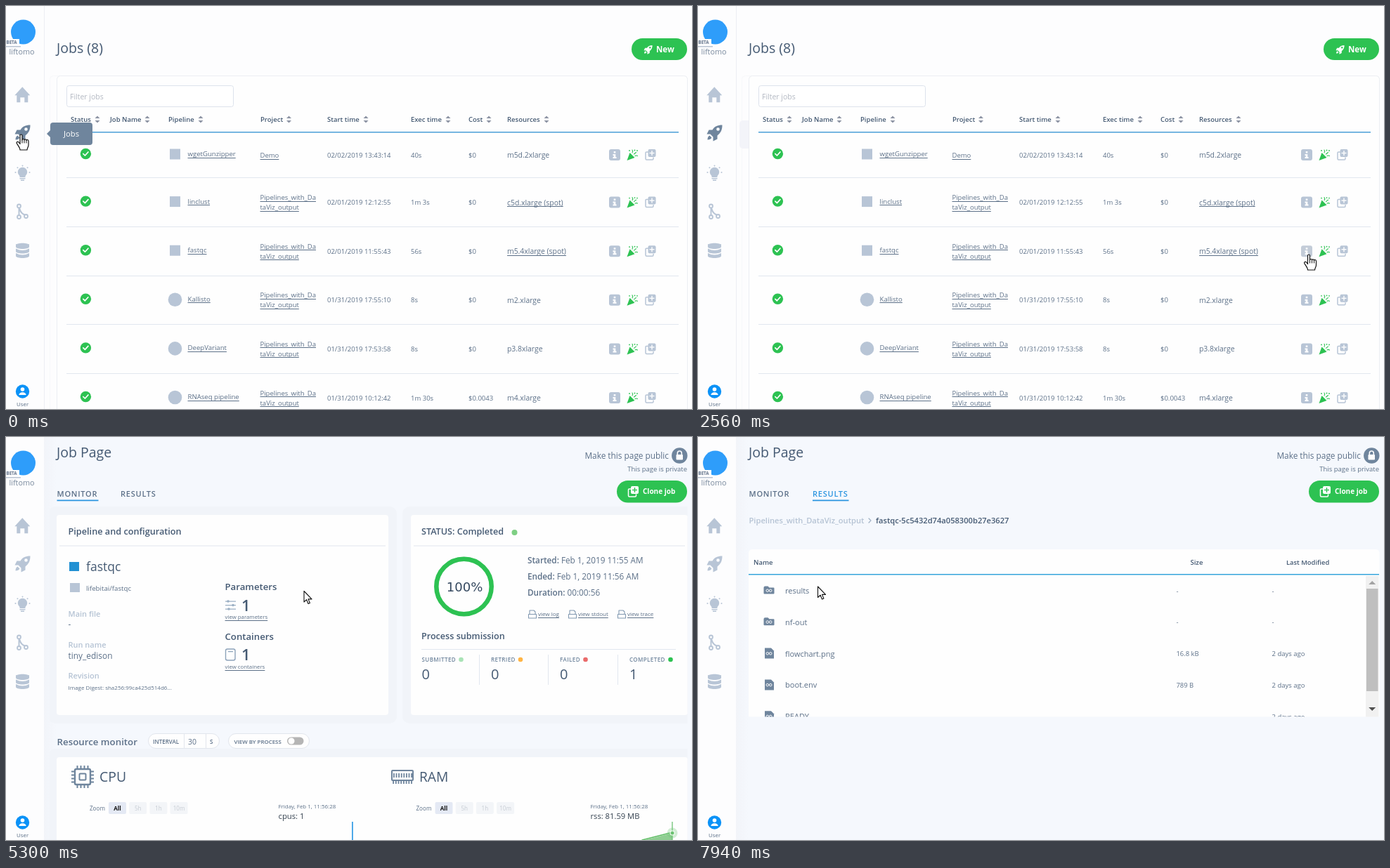
An HTML page with a canvas for the animation above (8000 ms loop, 976x574 px).

```html
<!DOCTYPE html>
<html lang="en">
<head>
<meta charset="utf-8">
<title>Job dashboard</title>
<style>
html, body { margin: 0; width: 100%; height: 100%; overflow: hidden; background: #fdfdfe; }
canvas { display: block; }
</style>
</head>
<body>
<canvas id="stage" width="976" height="574"></canvas>
<script>
const ctx = document.getElementById('stage').getContext('2d');
const LOOP = 8000;
const C = {
  dark: '#455a73', body: '#5c7088', soft: '#b5c3d4', icon: '#b8c5d6', slate: '#6f859d',
  blue: '#1890ff', line: '#2b95e0', green: '#2dc252', rule: '#e1e7ef', page: '#f5f8fd', white: '#fefefe'
};

const clamp = v => Math.max(0, Math.min(1, v));
const phase = (t, a, b) => clamp((t - a) / (b - a));
const ease = p => p * p * (3 - 2 * p);

function text(s, x, y, size, color = C.body, o = {}) {
  ctx.font = `${o.w || 400} ${size}px ${o.font || '"Open Sans", sans-serif'}`;
  ctx.letterSpacing = (o.ls || 0) + 'px';
  ctx.textAlign = o.align || 'left';
  ctx.fillStyle = color;
  ctx.fillText(s, x, y);
  const w = ctx.measureText(s).width;
  if (o.ul) rect(x, Math.round(y + 1.5), w, 1, color);
  ctx.letterSpacing = '0px';
  return w;
}
const bold = (s, x, y, size, color = C.dark, o = {}) => text(s, x, y, size, color, { w: 600, ...o });
const heading = (s, x, y, size) => text(s, x, y, size, C.dark, { w: 500 });

function rect(x, y, w, h, fill, r = 0, stroke, lw = 1) {
  ctx.beginPath();
  ctx.roundRect(x, y, w, h, r);
  if (fill) { ctx.fillStyle = fill; ctx.fill(); }
  if (stroke) { ctx.strokeStyle = stroke; ctx.lineWidth = lw; ctx.stroke(); }
}
function dot(x, y, r, fill) {
  ctx.beginPath();
  ctx.arc(x, y, r, 0, 7);
  ctx.fillStyle = fill;
  ctx.fill();
}
function shape(d, x, y, s, fill, stroke, lw = 1) {
  const p = new Path2D(d);
  ctx.save();
  ctx.translate(x, y);
  ctx.scale(s, s);
  ctx.lineJoin = ctx.lineCap = 'round';
  if (fill) { ctx.fillStyle = fill; ctx.fill(p, 'evenodd'); }
  if (stroke) { ctx.strokeStyle = stroke; ctx.lineWidth = lw; ctx.stroke(p); }
  ctx.restore();
}
function faded(alpha, draw) {
  if (alpha <= 0) return;
  ctx.save();
  ctx.globalAlpha = alpha;
  draw();
  ctx.restore();
}
function clipped(x, y, w, h, draw) {
  ctx.save();
  ctx.beginPath();
  ctx.rect(x, y, w, h);
  ctx.clip();
  draw();
  ctx.restore();
}

const ROCKET = 'M22 0C15 0 11 2 8 7H3L0 13h5l4 4v6l6-3v-5c5-4 7-8 7-15zM18.300 6a2.300 2.300 0 1 1-4.600 0a2.300 2.300 0 1 1 4.600 0zM4 15c-2 1-3 3-3 6c3 0 5-1 6-3z';
const CLONE = 'M4 4H1.500Q.5 4 .5 5V13.500Q.5 15 2 15H10Q11.500 15 11.500 13.500V12';
const HAND = 'M-2 1.500C-2-.5 1-.5 1 1.500V8C1 6 4 6 4 8C4 6.500 7 6.500 7 8.500C7 7 10 7 10 9.500V15C10 18 8 19 8 22H-2C-2 19-4 17-6.500 13C-8 10.500-5 9.500-3.500 11.500L-2 13.500Z';
const ARROW = 'M0 0V15.500L3.600 12.200L6 18L8.400 17L6 11.400H11Z';
const IBEAM = 'M-3-7Q0-7 0-5.500Q0-7 3-7M0-5.500V5.500M-3 7Q0 7 0 5.500Q0 7 3 7';

function cloneIcon(x, y, color) {
  shape(CLONE, x, y, 1, null, color, 1.5);
  rect(x + 4, y, 11, 11, color, 2);
  const hole = color === C.icon ? C.white : C.green;
  rect(x + 6, y + 4.8, 7, 1.4, hole);
  rect(x + 8.8, y + 2, 1.4, 7, hole);
}
function popper(x, y) {
  shape('M4 5L0 16L11 12Z', x, y, 1, C.green);
  shape('M7.500 5Q9 3 7.500 1M10 7L13 4.500M11.500 9.500Q13 8.500 15 9.500', x, y, 1, null, C.green, 1.1);
  for (const [a, b] of [[3.5, 2], [11, 1.5], [14.5, 2]]) dot(x + a, y + b, .9, C.green);
}

function sidebar(onJobs) {
  rect(0, 0, 54, 574, '#fdfdfe');
  dot(24.5, 37, 17.5, '#2e9dfa');
  rect(0, 47, 19, 9, '#fdfdfe');
  text('BETA', .5, 54, 6.2, '#65758c', { w: 700 });
  rect(0, 57, 21, 1.5, '#b9c3d1');
  text('liftomo', 4.5, 69, 10.8, '#78889c');
  shape('M0 12L11 0L22 12H19V22H14V15H8V22H3V12Z', 12.3, 115.3, 1, C.icon);
  shape(ROCKET, 12.5, 169.5, 1, onJobs ? C.slate : C.icon);
  dot(23.5, 236.5, 6.7, C.icon);
  shape('M-4 6H4V8H-4ZM-4 9H4V10.500H-4ZM-2.500 11.500H2.500V13H-2.500Z', 23.5, 236, 1, C.icon);
  for (let i = 0; i < 5; i++) {
    const a = Math.PI * (1 + i / 4);
    dot(23.5 + 10 * Math.cos(a), 237 + 9.5 * Math.sin(a), 1, C.icon);
  }
  shape('M0 3V14M1 4Q2 10 9 13', 18.5, 285, 1, null, C.icon, 2);
  for (const [x, y] of [[18.5, 285], [18.5, 300.5], [28.5, 299.5]]) {
    dot(x, y, 3.4, C.icon);
    dot(x, y, 1.5, C.white);
  }
  for (const y of [341.5, 348, 354.5])
    shape('M-9.500-2.500Q0 2.500 9.500-2.500V1.500C9.500 5.500-9.500 5.500-9.500 1.500Z', 23.5, y, 1, C.icon);
  shape('M-9.500 0C-9.500-4.500 9.500-4.500 9.500 0C9.500 4-9.500 4-9.500 0Z', 23.5, 341, 1, C.icon);
  dot(23.5, 549, 9.7, '#0b92f7');
  dot(23.5, 546, 2.8, '#fff');
  shape('M-5 5C-5 0 5 0 5 5Z', 23.5, 549, 1, '#fff');
  text('User', 15, 570, 7.9);
}

const HEADERS = [['Status', 92, 130], ['Job Name', 148, 201], ['Pipeline', 231, 277], ['Project', 362, 402.5],
  ['Start time', 457, 512], ['Exec time', 576, 629], ['Cost', 658, 687], ['Resources', 713, 769]];
const JOBS = [
  ['wgetGunzipper', '02/02/2019 13:43:14', '40s', '$0', 'm5d.2xlarge'],
  ['linclust', '02/01/2019 12:12:55', '1m 3s', '$0', 'c5d.xlarge (spot)'],
  ['fastqc', '02/01/2019 11:55:43', '56s', '$0', 'm5.4xlarge (spot)'],
  ['Kallisto', '01/31/2019 17:55:10', '8s', '$0', 'm2.xlarge'],
  ['DeepVariant', '01/31/2019 17:53:58', '8s', '$0', 'p3.8xlarge'],
  ['RNAseq pipeline', '01/31/2019 10:12:42', '1m 30s', '$0.0043', 'm4.xlarge']];

function jobRow([name, start, exec, cost, machine], i, hover) {
  const y = i ? 210 + 69.6 * i : 212;
  const ul = { ul: true };
  dot(113.4, y - 1.5, 7.7, C.green);
  shape('M-3.500 0L-1 2.500L3.500-2.500', 113.4, y - 1.5, 1, null, '#fff', 1.7);
  if (i < 3) rect(233, y - 8.5, 15, 15, C.icon);
  else dot(240.5, y - .5, 9.8, C.icon);
  text(name, 258.5, y + 2, 9.6, C.body, ul);
  if (i) {
    text('Pipelines_with_Da', 361.5, y - 3.5, 9.5, C.body, ul);
    text('taViz_output', 361.5, y + 10.5, 9.5, C.body, ul);
  } else text('Demo', 361.5, y + 4, 9.5, C.body, ul);
  text(start, 457, y + 3.5, 9.5);
  text(exec, 576, y + 3.5, 9.5);
  text(cost, 658, y + 3.5, 9.5);
  text(machine, 713, y + 4, 10.4, C.body, { ul: machine.includes('spot') });
  rect(858, y - 8, 16, 16, hover ? '#c3ccd8' : C.icon, 3);
  shape('M-1.300-5H1.300V-2.500H-1.300ZM-2.500-1H1.300V3H2.500V5H-2.500V3H-1.300V1H-2.500Z', 866, y, 1, '#fff');
  popper(883.5, y - 8);
  cloneIcon(909.5, y - 8, C.icon);
  if (i < 5) rect(86, i ? Math.round(244.5 + 69.5 * i) : 244, 871, 1, C.rule);
}

function tooltip(x, y, w, h, label, down) {
  rect(x, y, w, h, C.slate, 4);
  if (down) shape('M-5 0H5L0 5Z', x + w / 2, y + h, 1, C.slate);
  else shape('M0-5V5L-5 0Z', x, y + h / 2, 1, C.slate);
  text(label, x + w / 2, y + h / 2 + 4, 11.2, '#fff', { align: 'center' });
}

function jobsPage(t) {
  rect(0, 0, 976, 574, '#fdfdfe');
  rect(54, 0, 1, 574, '#eceef3');
  rect(62.5, 99.5, 907, 500, null, 5, '#f7f8fa');
  faded(phase(t, 480, 640), () => rect(59, 163, 13, 40, '#f3f4f9', [5, 0, 0, 5]));
  rect(72.5, 99.5, 897, 500, C.white, 5, '#eceef3');
  sidebar(true);
  heading('Jobs (8)', 72, 67, 19.5);
  rect(890, 46, 79, 31, C.green, 15.5);
  shape(ROCKET, 907.5, 56, .55, '#fff');
  text('New', 925, 66, 11.5, '#fff', { w: 700 });
  rect(86.5, 113.5, 237, 30, '#fff', 3, '#dde2ec');
  text('Filter jobs', 91, 132.5, 10.5, '#b3b8c2');
  for (const [label, x, sort] of HEADERS) {
    bold(label, x, 165, 9.5);
    shape('M-3.500-1.500H3.500L0-5ZM-3.500 1.500H3.500L0 5Z', sort, 161.5, 1, '#8c93a3');
  }
  rect(86, 179, 871, 1.5, '#4b9fd8');
  JOBS.forEach((job, i) => jobRow(job, i, i === 2 && t > 2450));
  faded(1 - phase(t, 480, 640), () => tooltip(63, 166, 60, 32, 'Jobs'));
  faded(phase(t, 2570, 2720), () => tooltip(794, 300, 146, 32, 'View job information', true));
}

function loading(t) {
  rect(0, 0, 976, 574, '#fdfdfd');
  rect(54, 0, 8, 574, '#f8f8fa');
  sidebar(false);
  faded(phase(t, 3730, 3880), () => {
    const turn = (t - 4430) / 1200 * Math.PI * 2;
    for (let i = 0; i < 4; i++) {
      const a = turn + Math.PI / 2 * (i + 1);
      faded(ctx.globalAlpha * [1, .5, .4, .5][i] * .8, () =>
        dot(501 + 6.4 * Math.cos(a), 330.3 + 6.4 * Math.sin(a), 2.9, '#1c9cf6'));
    }
    text('Checking job data...', 450.5, 354, 11.1, C.blue);
  });
}

function halo(x, y, w, h) {
  rect(x - 12, y - 12, w + 24, h + 24, '#f1f4f9', 10);
}

function jobHeader(t) {
  rect(0, 0, 976, 574, C.page);
  const shade = ctx.createLinearGradient(54, 0, 72, 0);
  shade.addColorStop(0, '#f2f4f9');
  shade.addColorStop(1, C.page);
  rect(54, 0, 18, 574, shade);
  sidebar(false);
  heading('Job Page', 72, 28.5, 19.5);
  const results = t >= 7170;
  bold('MONITOR', 72.5, 84.5, 11, C.body, { ls: .75 });
  bold('RESULTS', 163, 84.5, 11, t > 6280 ? C.line : C.body, { ls: .75 });
  rect(results ? 163 : 72.5, 89.5, results ? 51.5 : 59, 1.8, C.line);
  text('Make this page public', 943, 31, 11.85, C.body, { align: 'right' });
  text('This page is private', 969, 49, 9.5, C.body, { align: 'right' });
  dot(958.3, 26.5, 11.2, C.slate);
  rect(953.5, 25, 9.5, 7.5, '#fff', 1);
  shape('M-3 4V1C-3-3 3-3 3 1V4', 958.3, 22, 1, null, '#fff', 1.6);
  rect(869, 62, 100, 31.5, C.green, 15.8);
  cloneIcon(885, 70, '#fff');
  text('Clone job', 906, 81, 10, '#fff', { w: 700 });
}

function pipelineCard() {
  rect(72, 111, 472, 285, C.white, 4);
  bold('Pipeline and configuration', 88.5, 139, 12.7);
  rect(76, 154.5, 464, 1, C.rule);
  rect(90, 178, 14, 13, '#2391d3');
  heading('fastqc', 114, 190.5, 17.5);
  rect(91, 208, 14, 13, C.icon);
  text('lifebitai/fastqc', 114, 218.5, 9.7);
  bold('Main file', 88.5, 255.5, 11, C.soft);
  text('-', 88.5, 271, 11.9);
  bold('Run name', 88.5, 300, 11, C.soft);
  text('tiny_edison', 88.5, 316, 11.9);
  bold('Revision', 88.5, 344, 11, C.soft);
  text('Image Digest: sha256:99ca425d514d6...', 88.5, 360, 8);
  bold('Parameters', 311.5, 218, 13.2);
  for (const [y, k] of [[234, 316], [239.5, 323], [245, 317]]) {
    rect(312, y - .5, 15, 1.2, '#9bafc4');
    dot(k, y, 1.8, '#9bafc4');
  }
  bold('1', 335, 248, 22);
  text('view parameters', 311.5, 259, 7.85, C.body, { ul: true });
  bold('Containers', 311.5, 288.5, 13.2);
  rect(312.5, 302, 13.5, 16, null, 2.5, '#8da3ba', 1.4);
  rect(316, 305, 7, 1.2, '#8da3ba');
  bold('1', 335, 318, 22);
  text('view containers', 311.5, 330, 7.85, C.body, { ul: true });
}

function statusCard(t) {
  rect(576, 111, 394, 285, C.white, 4);
  bold('STATUS: Completed', 591, 139, 12.6);
  dot(723.5, 136, 4, '#7ecf83');
  rect(580, 154.5, 386, 1, C.rule);
  const done = ease(phase(t, 4500, 5200));
  ctx.lineWidth = 6.5;
  ctx.strokeStyle = '#edf1f5';
  ctx.beginPath();
  ctx.arc(651.5, 213, 39.2, 0, 7);
  ctx.stroke();
  ctx.strokeStyle = C.green;
  ctx.beginPath();
  ctx.arc(651.5, 213, 39.2, -Math.PI / 2, Math.PI * (2 * done - .5));
  ctx.stroke();
  text(Math.round(done * 100) + '%', 652.5, 220, 18, '#34485f', { font: '"DejaVu Sans", sans-serif', align: 'center' });
  [['Started:', 'Feb 1, 2019 11:55 AM'], ['Ended:', 'Feb 1, 2019 11:56 AM'], ['Duration:', '00:00:56']].forEach(([k, v], i) => {
    const w = bold(k + ' ', 742, 180 + 23 * i, 11.75, C.body);
    text(v, 742 + w, 180 + 23 * i, 11.75);
  });
  [['view log', 743], ['view stdout', 800], ['view trace', 870]].forEach(([s, x]) => {
    shape('M2 6V.5H8L10 2.500V6M.5 6H11.500V11.500H.5Z', x, 246.5, 1, null, '#8299b1', 1.1);
    text(s, x + 14, 255, 8, C.body, { ul: true });
  });
  bold('Process submission', 591, 288, 12.6);
  rect(591, 302, 362, 1, C.rule);
  [['SUBMITTED', 0, 591.5, 647.5, '#a9e3b6'], ['RETRIED', 0, 690, 732, '#ffb545'],
    ['FAILED', 0, 788, 824.5, '#ea6b6b'], ['COMPLETED', 1, 887, 945.5, C.green]].forEach(([s, n, x, d, color], i) => {
    bold(s, x, 320, 8, C.slate, { ls: .4 });
    dot(d, 317, 3.3, color);
    heading(n, x, 345, 20);
    if (i) rect([673, 771, 870][i - 1], 310, 1, 43, C.rule);
  });
}

function zoomBar(x) {
  text('Zoom', x, 532, 8.1);
  ['All', '5h', '1h', '10m'].forEach((s, i) => {
    rect(x + 27 + 29.2 * i, 520, 25, 17, i ? '#f3f5f8' : '#e4e9f4', 2);
    text(s, x + 39.5 + 29.2 * i, 532, 8.1, i ? '#c5cbd3' : '#111', { w: i ? 400 : 700, align: 'center' });
  });
}

function cpuIcon() {
  rect(98, 473, 22, 22, null, 2, C.slate, 2.4);
  rect(104.5, 479.5, 9, 9, null, 1, C.slate, 2);
  for (let i = 0; i < 4; i++) {
    const d = 5 * i;
    for (const y of [468, 496]) rect(100.5 + d, y, 2, 4, C.slate);
    for (const x of [93, 121]) rect(x, 475.5 + d, 4, 2, C.slate);
  }
}
function ramIcon() {
  rect(549, 475, 30, 14, null, 1, C.slate, 2);
  for (let i = 0; i < 8; i++) {
    rect(550.2 + 3.7 * i, 490, 1.8, 4, C.slate);
    rect(551 + 3.6 * i, 479, 1.8, 6, C.slate);
  }
}

function resourceMonitor(t) {
  bold('Resource monitor', 72.5, 438.5, 13.3, C.body);
  rect(202.5, 422.5, 101, 21, C.white, 10.5, '#e2e6ed');
  rect(253, 423, 1, 20, '#e2e6ed');
  rect(284, 423, 1, 20, '#e2e6ed');
  bold('INTERVAL', 209, 436.5, 8, C.body);
  text('30', 259, 437.5, 10.5);
  bold('S', 290, 436.5, 8, C.body);
  rect(316.5, 422.5, 115, 21, C.white, 10.5, '#e2e6ed');
  bold('VIEW BY PROCESS', 324.5, 436.5, 7.9, C.body);
  rect(400, 427.5, 23.5, 11, '#b5b5b5', 5.5);
  dot(406, 433, 4.5, '#fff');

  rect(72, 456, 898, 130, C.white, 4);
  cpuIcon();
  heading('CPU', 133, 491, 19.4);
  ramIcon();
  heading('RAM', 588, 491, 19.2);
  zoomBar(119);
  zoomBar(583.5);
  faded(phase(t, 4590, 4800), () => {
    text('Friday, Feb 1, 11:56:28', 387.5, 529, 7.95);
    text('cpus: 1', 387.5, 544, 11.3, '#34414f');
    text('Friday, Feb 1, 11:56:28', 831.5, 529, 7.95);
    text('rss: 81.59 MB', 831.5, 544, 11.2, '#34414f');
  });
  const grow = ease(phase(t, 4590, 5250));
  clipped(480, 545, 480 * grow, 40, () => {
    rect(492, 548, 1.8, 30, '#3a9fe6');
    shape('M905 575L948 564V575Z', 0, 0, 1, '#8fce92');
    shape('M905 574L948 563', 0, 0, 1, null, '#5fbd65', 1.5);
    rect(947.3, 548, 1.3, 27, '#6cc272');
    dot(948, 564, 7.5, 'rgba(110,195,115,.3)');
    dot(948, 564, 3.5, '#fff');
    dot(948, 564, 2.5, '#6cc272');
  });
}

function monitorTab(t) {
  clipped(62, 98, 907.5, 476, () => {
    halo(72, 111, 472, 285);
    halo(576, 111, 394, 285);
    halo(72, 456, 898, 130);
    pipelineCard();
    statusCard(t);
    resourceMonitor(t);
  });
}

const FILES = [['results', '-', '-'], ['nf-out', '-', '-'], ['flowchart.png', '16.8 kB', '2 days ago'],
  ['boot.env', '789 B', '2 days ago'], ['READY', '', '2 days ago']];

function resultsTab() {
  bold('Pipelines_with_DataViz_output', 72.5, 122.5, 11.15, C.soft);
  shape('M0 0L3 3L0 6', 243, 116, 1, null, '#9fb0c3', 1.2);
  bold('fastqc-5c5432d74a058300b27e3627', 253, 122.5, 11.15);
  rect(72, 160, 897.5, 238.5, C.white, [5, 5, 0, 0]);
  bold('Name', 79, 181.5, 9.5);
  bold('Size', 700.5, 181.5, 9.5);
  bold('Last Modified', 837, 181.5, 9.4);
  rect(72, 195, 897, 1.6, '#36a5dc');
  clipped(72, 198, 898, 200.5, () => {
    FILES.forEach(([name, size, when], i) => {
      const y = 219 + 44.8 * i;
      if (i < 2) shape('M0 2Q0 0 2 0H6L8 2H14Q15 2 15 3V10Q15 11 14 11H1Q0 11 0 10Z', 93.5, y - 6.5, 1, C.slate);
      else shape('M1 0H10L14 4V15H1Z', 94, y - 8, 1, C.slate);
      for (const x of [97, 101.5]) rect(x, y - 2, 3.5, 3.5, null, 1.7, '#fff');
      text(name, 124, y + 4, 11);
      text(size, 680.5, y + 3.5, 9.4);
      text(when, 816.5, y + 3.5, 9.5);
    });
    rect(950, 198, 18.5, 201, '#f1f1f1');
    rect(951, 216, 16.5, 146, '#bfbfbf');
    shape('M-5 2.500H5L0-2.500Z', 959.2, 207.5, 1, '#a3a3a3');
    shape('M-5-2.500H5L0 2.500Z', 959.2, 387.5, 1, '#505050');
  });
}

function jobPage(t) {
  jobHeader(t);
  if (t < 7080) monitorTab(t);
  else if (t < 7250) clipped(72, 98, 897, 13, () => {
    halo(72, 111, 472, 285);
    halo(576, 111, 394, 285);
  });
  faded(phase(t, 7250, 7500), resultsTab);
}

// Each move: start, end, destination x and y.
const MOVES = [[480, 940, 481.5, 349], [1250, 1400, 878, 377], [1800, 2020, 869, 363], [2420, 2540, 869.5, 354],
  [4590, 5300, 424, 219.5], [5380, 5420, 361.5, 199.5], [5580, 6010, 190, 101], [6160, 6390, 190, 78],
  [6850, 6930, 197.5, 78], [7870, 7940, 170.5, 213]];

function cursor(t) {
  let x = 22, y = 183;
  for (const [a, b, tx, ty] of MOVES) {
    const p = ease(phase(t, a, b));
    x += (tx - x) * p;
    y += (ty - y) * p;
  }
  const hand = t < 480 || (t >= 2480 && t < 3730) || (t >= 6280 && t < 7870);
  if (hand) {
    shape(HAND, x, y, 1, '#fff', '#111', 1.2);
    shape('M1 8V12M4 8.500V12M7 9V12', x, y, 1, null, '#111', 1);
  } else if (t >= 900 && t < 1300) shape(IBEAM, x, y, 1, null, '#111', 1.2);
  else shape(ARROW, x, y, 1, '#fff', '#111', 1.1);
}

function frame() {
  const t = performance.now() % LOOP;
  if (t < 3730) jobsPage(t);
  else if (t < 4500) loading(t);
  else jobPage(t);
  cursor(t);
  requestAnimationFrame(frame);
}
frame();
</script>
</body>
</html>
```
